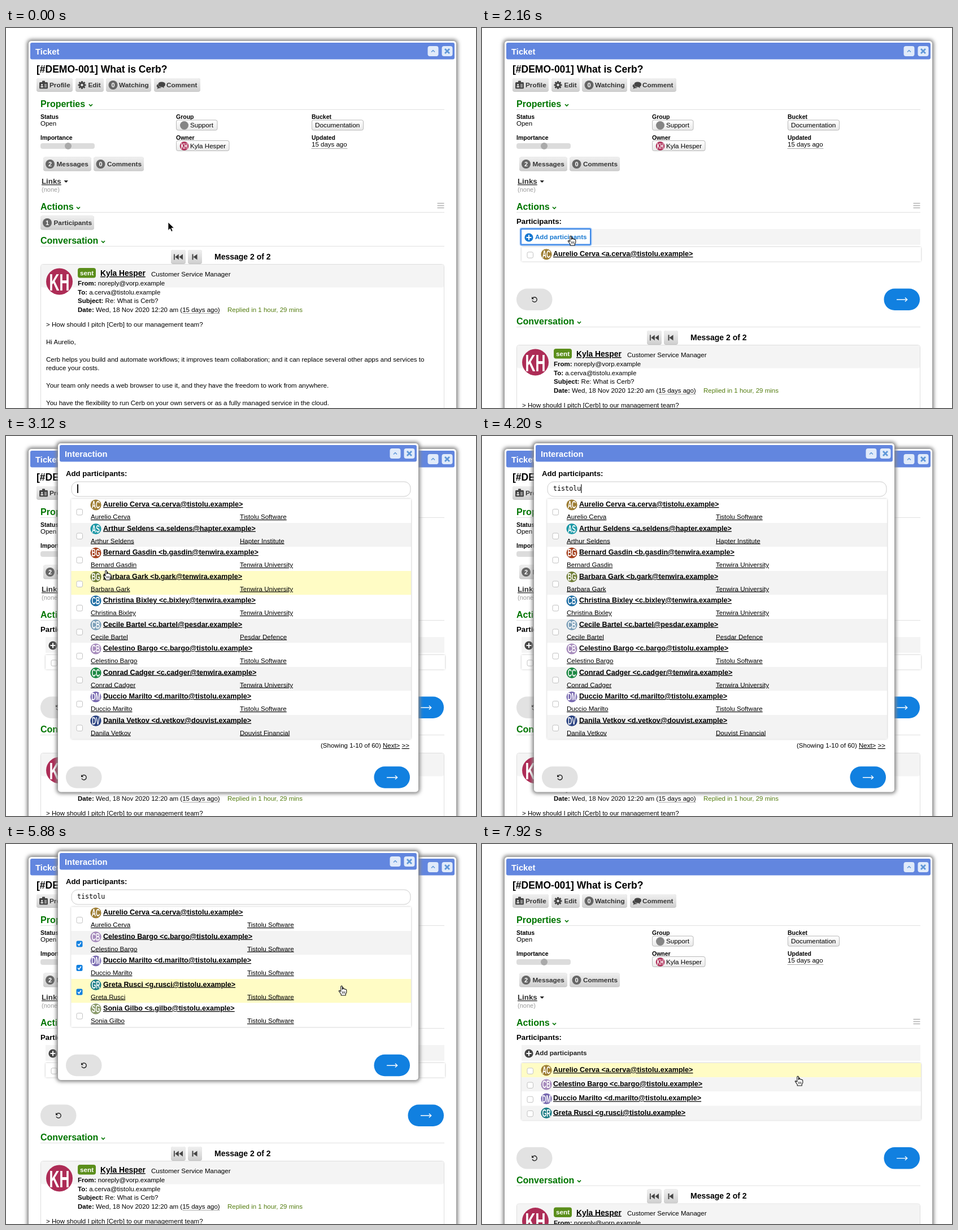
An HTML page that plays this animation: 832x673 px, repeating every 8 s.

```html
<!DOCTYPE html>
<html lang="en">
<head>
<meta charset="utf-8">
<title>Ticket</title>
<style>
html, body { margin: 0; width: 100%; height: 100%; overflow: hidden; background: #fff; }
svg { display: block; width: 832px; height: 673px; font-family: "Liberation Sans", Arial, sans-serif; }
text { white-space: pre; fill: #000; }
.b { font-weight: 700; }
.u { text-decoration: underline; }
.dim { fill: #333; }
.white { fill: #fff; }
.head { font-weight: 700; fill: #007500; }
.condensed { font-weight: 700; text-anchor: middle; fill: #fff; transform: scaleX(.58); }
.mono { font-family: "DejaVu Sans Mono", monospace; }
</style>
</head>
<body>
<svg viewBox="0 0 832 673">
  <defs>
    <linearGradient id="grey" x2="0" y2="1"><stop stop-color="#f0f0f0"/><stop offset="1" stop-color="#cfcfcf"/></linearGradient>
    <linearGradient id="pale" x2="0" y2="1"><stop stop-color="#fff"/><stop offset="1" stop-color="#e9e9e9"/></linearGradient>
    <filter id="soft" x="-10%" y="-40%" width="120%" height="180%"><feGaussianBlur stdDeviation="3.2"/></filter>
    <filter id="thin" x="-5%" y="-40%" width="110%" height="180%"><feGaussianBlur stdDeviation="1.5"/></filter>
  </defs>
  <g id="stage"></g>
</svg>
<script>
const LOOP = 8000, STEP = 120;
const QUERY = 'tistolu';
const BLUE = '#1180e0', YELLOW = '#fffcc5';
const ROW = 25.2, CARD = 42.5;

const orgs = {
  tistolu: 'Tistolu Software', hapter: 'Hapter Institute', tenwira: 'Tenwira University',
  pesdar: 'Pesdar Defence', douvist: 'Douvist Financial'
};
const people = [
  ['Aurelio Cerva', 'tistolu', '#9d7d33'],
  ['Arthur Seldens', 'hapter', '#1c98a6'],
  ['Bernard Gasdin', 'tenwira', '#a4411f'],
  ['Barbara Gark', 'tenwira', '#6e7c35'],
  ['Christina Bixley', 'tenwira', '#1d6da3'],
  ['Cecile Bartel', 'pesdar', '#7c9fb8'],
  ['Celestino Bargo', 'tistolu', '#a58abb'],
  ['Conrad Cadger', 'tenwira', '#1a8741'],
  ['Duccio Marilto', 'tistolu', '#7566ae'],
  ['Danila Vetkov', 'douvist', '#28407f'],
  ['Greta Rusci', 'tistolu', '#1c7d86'],
  ['Sonia Gilbo', 'tistolu', '#8a9a6a']
].map(([name, org, color]) => {
  const [first, last] = name.split(' ');
  const email = `${first[0]}.${last}@${org}.example`.toLowerCase();
  return { name, org, color, initials: first[0] + last[0], label: `${name} &lt;${email}&gt;` };
});
const firstPage = people.slice(0, 10);
const matches = people.filter(p => p.org === QUERY);
const picked = matches.slice(0, 4);

// Pointer tip: time, x, y
const path = [
  [240, 287, 344], [720, 126, 346], [1080, 126, 346], [1800, 157, 368], [2160, 157, 368],
  [2640, 177, 238], [3360, 177, 238], [4560, 300, 205], [4920, 596, 141], [5160, 595, 166],
  [5400, 595, 170], [5520, 594, 206], [5640, 594, 210], [5760, 594, 248], [6000, 594, 254],
  [6120, 692, 392], [6840, 695, 394], [7080, 695, 394], [7440, 640, 468], [7560, 612, 468],
  [7920, 559, 411]
];

const text = (x, y, size, s, cls = '', extra = '') =>
  `<text x="${x}" y="${y}" font-size="${size}" class="${cls}" ${extra}>${s}</text>`;
const rect = (x, y, w, h, fill, r = 0, extra = '') =>
  `<rect x="${x}" y="${y}" width="${w}" height="${h}" rx="${r}" fill="${fill}" ${extra}/>`;
const circle = (x, y, r, fill) => `<circle cx="${x}" cy="${y}" r="${r}" fill="${fill}"/>`;
const line = (d, color, w = 1, extra = '') =>
  `<path d="${d}" fill="none" stroke="${color}" stroke-width="${w}" ${extra}/>`;
const shape = (d, fill = '#444', extra = '') => `<path d="${d}" fill="${fill}" ${extra}/>`;
const at = (x, y, s) => `<g transform="translate(${x} ${y})">${s}</g>`;
const dotted = d => line(d, '#555', 1, 'stroke-dasharray="1 1"');

const button = (x, y, w, h) =>
  rect(x, y, w, h, '#c4c4c4', 4) + rect(x, y, w, h - 1, 'url(#grey)', 4);
const bubble = (x, y, w) =>
  rect(x + .5, y + .5, w - 1, 18, 'url(#pale)', 3, 'stroke="#b8b8b8"');
const badge = (x, y, n) =>
  circle(x, y, 8, '#666') + text(x, y + 4, 11, n, 'b white', 'text-anchor="middle"');
const avatar = (x, y, r, color, initials) => circle(x, y, r, color) +
  at(x, y + r * .66, `<text class="condensed" font-size="${r * 1.82}">${initials}</text>`);
const checkbox = (x, y, on) => on
  ? rect(x - 5.5, y - 5.5, 11, 11, BLUE, 2.5) + line(`M${x - 2.8} ${y}l2 2.6 3.6-5.4`, '#fff', 1.6)
  : rect(x - 5, y - 5, 10.5, 10.5, '#fff', 2.5, 'stroke="#c2c2c2"');
const listShadow = (x, y, w, h) =>
  rect(x, y, w, h, '#b4b4b4', 2, 'filter="url(#thin)"') + rect(x, y, w, h, '#fff', 1);
const heading = (y, s, chevron) =>
  text(61, y, 16, s, 'head') + line(`M${chevron - 3} ${y - 5}l3 3 3-3`, '#007500', 1.7) +
  line(`M61 ${y + 4.5}H776`, '#e0e0e0');
const spinner = (x, y) => circle(x, y, 1.8, '#222');

function windowFrame(x, y, w, h, title) {
  const icon = (cx, mark, weight) =>
    rect(cx - 9.5, y + 9, 19, 18, '#e1ebfa', 4) + line(mark, '#5f97d8', weight);
  const up = x + w - 41, close = x + w - 16, cy = y + 18;
  return rect(x - 3, y - 3, w + 6, h + 6, '#868686', 8, 'filter="url(#soft)"') +
    rect(x, y, w, h, '#fff', 5) + rect(x + 3, y + 3, w - 6, 29.5, '#6286df', 3) +
    text(x + 12, y + 23.5, 14.8, title, 'b white') +
    icon(up, `M${up - 3} ${cy + 1.5}l3-3 3 3`, 1.5) +
    icon(close, `M${close - 4} ${cy - 4}l8 8m0-8l-8 8`, 2.8);
}

function pills(left, right, cy) {
  return rect(left, cy - 19.5, 63.5, 38.5, '#e2e2e2', 19) +
    line(`M${left + 28.2} ${cy - 2.2}a4.3 4.3 0 1 1-.2 4`, '#222', 1.4) +
    shape(`M${left + 27} ${cy - 5}v4.2h4.2z`, '#222') +
    rect(right, cy - 19.5, 63.5, 38.5, BLUE, 19) +
    line(`M${right + 22.5} ${cy}h18.5m-3.6-3.4l3.8 3.4-3.8 3.4`, '#fff', 1.4);
}

function gear(x, y) {
  const tooth = rect(x - 1.5, y - 7, 3, 4, '#444', .5);
  let teeth = '';
  for (let a = 0; a < 360; a += 45) teeth += `<g transform="rotate(${a} ${x} ${y})">${tooth}</g>`;
  return circle(x, y, 5, '#444') + teeth + circle(x, y, 2.2, '#e2e2e2');
}

const ticket = windowFrame(40, 23, 757, 690, 'Ticket') +
  text(54, 78.5, 17.5, '[#DEMO-001] What is Cerb?', 'b') +
  button(54, 89, 64, 24) + button(123, 89, 50, 24) + button(177, 89, 80, 24) + button(262, 89, 82, 24) +
  rect(59, 96, 15, 11.5, '#444', 1.5) + rect(64, 93.5, 5, 4, '#444', 1) + circle(63.6, 100.5, 1.6, '#e6e6e6') +
  rect(61.5, 102.8, 4.3, 2.4, '#e6e6e6') + line('M68 100h4m-4 2.2h4m-4 2.2h4', '#e6e6e6') +
  gear(134.5, 101) + badge(189.5, 101, 0) +
  shape('M271 96.5c3-2 11-1.5 11 3.2 0 3-2 4-3 4.4l1.2 2.4-3.8-1.9c-6 .4-9-4.8-5.4-8.1z') +
  shape('M269 99.5c-3 1-3 4.5-.5 6l-.9 2.4 3-1.5c2 .2 3.5 0 4.5-.6-3.5-.8-5.7-3-6.1-6.3z') +
  [['Profile', 77], ['Edit', 145.5], ['Watching', 200], ['Comment', 284]]
    .map(([s, x]) => text(x, 104.5, 11.8, s, 'b dim')).join('') +
  heading(140, 'Properties', 150) +
  [['Status', 61, 160.5], ['Group', 301, 160.5], ['Bucket', 541, 160.5],
    ['Importance', 61, 197.5], ['Owner', 301, 197.5], ['Updated', 541, 197.5]]
    .map(([s, x, y]) => text(x, y, 10.5, s, 'b')).join('') +
  text(61, 173, 11.5, 'Open') + text(541, 210, 11.5, '15 days ago') + dotted('M541 213.5h63') +
  bubble(301, 162.5, 73.5) + circle(315.5, 172.5, 7.5, '#858585') + text(326, 176, 11.7, 'Support') +
  bubble(301, 199, 94.5) + avatar(315.5, 209, 7.8, '#ad2c56', 'KH') + text(326, 213, 11.6, 'Kyla Hesper') +
  bubble(541, 162.5, 92) + text(547, 176, 11.8, 'Documentation') +
  rect(61, 204, 96, 10, '#dcdcdc', 4) + circle(110, 209, 6, '#aaa') +
  button(66, 228.5, 85, 25) + badge(78, 241, 2) + text(89.5, 244.5, 11.8, 'Messages', 'b dim') +
  button(155, 228.5, 89, 25) + badge(167.5, 241, 0) + text(179, 244.5, 11.8, 'Comments', 'b dim') +
  text(63, 276, 13.3, 'Links', 'b u dim') + shape('M102.5 270h7.5l-3.7 4z', '#222') +
  text(63, 290, 11, '(none)', '', 'style="fill:#999"') +
  heading(322, 'Actions', 128);

const field = (y, key, value) => text(127, y, 11.5, `<tspan class="b">${key}:</tspan> ${value}`);
const conversation = heading(382, 'Conversation', 172) +
  button(292, 393, 26, 25) + button(322, 393, 25, 25) +
  shape('M297 400.5h1.8v10h-1.8zM305.8 400.5v10l-6.5-5zM313 400.5v10l-6.5-5zM329.5 400.5h2v10h-2zM338.5 400.5v10l-7-5z') +
  text(369, 409.5, 14, 'Message 2 of 2', 'b') +
  rect(61.5, 418.5, 714, 400, '#fff', 4, 'stroke="#dedede"') + rect(62, 419, 713, 40.5, '#f4f4f4', 3) +
  avatar(94.5, 449, 23.5, '#ad2c56', 'KH') +
  rect(127, 425, 32, 17.5, '#5b8e1b', 4) + text(131, 437.5, 11.8, 'sent', 'b white') +
  text(167, 439, 13.8, 'Kyla Hesper', 'b u') + text(257, 439.5, 11.56, 'Customer Service Manager') +
  field(456, 'From', 'noreply@vorp.example') + field(471.5, 'To', 'a.cerva@tistolu.example') +
  field(487, 'Subject', 'Re: What is Cerb?') + field(502.5, 'Date', 'Wed, 18 Nov 2020 12:20 am (15 days ago)') +
  dotted('M313 505.5h66') +
  text(392, 502.5, 11.5, 'Replied in 1 hour, 29 mins', '', 'style="fill:#547d10"') +
  [
    '&gt; How should I pitch [Cerb] to our management team?', '', 'Hi Aurelio,', '',
    'Cerb helps you build and automate workflows; it improves team collaboration; and it can replace several other apps and services to',
    'reduce your costs.', '', 'Your team only needs a web browser to use it, and they have the freedom to work from anywhere.', '',
    'You have the flexibility to run Cerb on your own servers or as a fully managed service in the cloud.'
  ].map((s, i) => s && text(71, 529 + i * 15.45, 11.56, s)).join('');

const menuIcon = line('M763.5 310.5h12m-12 4h12m-12 4h12', '#b0b0b0', 1.3);

const arrow = shape('M0 0v14.5l3.4-3.2 2.3 5.2 2.5-1.1-2.3-5.1h4.6z', '#000', 'stroke="#fff" stroke-width=".8"');
const hand = shape(
  'M-1.2 1.2Q0-.6 1.4 1.2V6.5Q3-.2 3 5.6 5.4 4.6 5.8 6.5 8.8 5.6 8.8 8.5V12L7.2 14.5V17H-.8V15L-4.6 9.8Q-4.8 7.2-1.2 10.2z',
  '#fff', 'stroke="#111" stroke-width="1.1" stroke-linejoin="round"') +
  line('M1.5 10v4M3.6 10v4M5.7 10v4', '#111', .8);

function pointer(t) {
  const i = path.findIndex(p => p[0] >= t);
  if (i === 0) return { x: path[0][1], y: path[0][2] };
  const [t0, x0, y0] = path[i - 1], [t1, x1, y1] = path[i];
  const k = (t - t0) / (t1 - t0), e = k * k * (3 - 2 * k);
  return { x: x0 + (x1 - x0) * e, y: y0 + (y1 - y0) * e };
}

function addBar(hover, focus) {
  const color = hover ? '#1878d0' : '#444';
  const ring = rect(68.5, 355.5, 124, 28.5, '#fff', 2, 'stroke="#9cc4f5" stroke-width="4"') +
    rect(69, 356, 123, 27.5, '#fff', 1, 'stroke="#3b86e6" stroke-width="2"');
  return rect(70, 356, 706, 28, '#f4f4f4') + (focus ? ring : '') +
    circle(83, 371, 7.6, color) + line('M83 366.5v9m-4.5-4.5h9', '#fff', 2) +
    text(94, 374, 11.6, 'Add participants', 'b', `style="fill:${hover ? color : '#222'}"`);
}

function participants(list, hoverRow) {
  return listShadow(70, 388, 707, ROW * list.length) + list.map((p, i) => {
    const y = 388 + i * ROW;
    return rect(70, y, 707, ROW, i === hoverRow ? YELLOW : i % 2 ? '#f4f4f4' : '#fff') +
      checkbox(85, y + 13.8) + avatar(114, y + 12.8, 9.6, p.color, p.initials) +
      text(126, y + 16, 12.6, p.label, 'b u');
  }).join('');
}

function chooser(list, hoverRow, ticked, orgX) {
  return listShadow(115.5, 111.5, 601.5, CARD * list.length) + list.map((p, i) => {
    const y = 111.5 + i * CARD;
    return rect(115.5, y, 601.5, CARD, i === hoverRow ? YELLOW : i % 2 ? '#f3f3f3' : '#fff') +
      checkbox(130, y + 23, i && i <= ticked) + avatar(159, y + 10.5, 9.6, p.color, p.initials) +
      text(172, y + 13.5, 12.6, p.label, 'b u') + text(150, y + 35.5, 11.6, p.name, 'u') +
      text(orgX, y + 35.5, 11.6, orgs[p.org], 'u');
  }).join('');
}

function popup(t, cursor) {
  const form = t >= 2520 && t < 6120;
  if (!form) return windowFrame(92, 13, 638, 142, 'Interaction') + spinner(140, 74);

  const filtered = t >= 4560;
  const list = filtered ? matches : firstPage;
  const end = 111.5 + CARD * list.length;
  const typed = QUERY.slice(0, Math.max(0, Math.floor((t - 3360) / STEP) + 1));
  const ticked = [5280, 5640, 5880].filter(s => t >= s).length;
  const hoverRow = cursor ? Math.floor((cursor.y + 2 - 111.5) / CARD) : -1;
  const fade = Math.min(1, .4 + (t - 2520) / 300);
  const caret = rect(126 + typed.length * 7.04, 85.5, typed ? 1.2 : 2, 15.5, '#111');
  const pager = text(557, 552, 11.5,
    '(Showing 1-10 of 60) <tspan class="u">Next&gt;</tspan> <tspan class="u">&gt;&gt;</tspan>');
  return windowFrame(92, 13, 638, end + 81, 'Interaction') +
    text(106, 70.5, 13.2, 'Add participants:', 'b') +
    rect(116, 81, 600, 26, '#fff', 11, 'stroke="#ccc"') + text(126, 97, 11.7, typed, 'mono') +
    (filtered ? '' : caret) +
    `<g opacity="${fade}">${chooser(list, hoverRow, ticked, filtered ? 427 : 414)}` +
    `${filtered ? '' : pager}${pills(106, 651.5, end + 68.2)}</g>`;
}

function draw(t) {
  const loading = t >= 840 && t < 1200, opened = t >= 1200, modal = t >= 2280 && t < 6960;
  const list = t >= 7080 ? picked : people.slice(0, 1);
  const extra = ROW * (list.length - 1);
  const shift = opened ? 143 + extra : loading ? 60 : 0;
  const cursor = t >= 3360 && t < 4680 ? null : pointer(t);

  let actions;
  if (opened) {
    const reachable = !modal || t >= 6120;
    const row = reachable ? Math.floor((cursor.y + 2 - 388) / ROW) : -1;
    const onAdd = !modal && cursor.x < 193 && cursor.y > 355 && cursor.y < 384;
    actions = text(61, 347, 13.2, 'Participants:', 'b') + addBar(onAdd, onAdd && t >= 2040) +
      participants(list, row) + pills(61, 711.5, 481 + extra);
  } else if (loading) {
    actions = spinner(96, 361);
  } else {
    actions = button(61, 332.5, 95, 25) + badge(73, 345, 1) + text(84.5, 348.5, 11.8, 'Participants', 'b dim');
  }

  const overLink = t >= 600 && !loading && !(opened && t < 1440);
  return ticket + (modal ? '' : menuIcon) + actions + at(0, shift, conversation) +
    (modal ? popup(t, cursor) : '') +
    (cursor ? at(cursor.x, cursor.y, overLink ? hand : arrow) : '');
}

const stage = document.getElementById('stage');
const start = performance.now();
let shown = -1;
function tick() {
  const elapsed = (performance.now() - start) % LOOP;
  const t = Math.floor(elapsed / STEP) * STEP;
  if (t !== shown) stage.innerHTML = draw(shown = t);
  requestAnimationFrame(tick);
}
tick();
</script>
</body>
</html>
```
